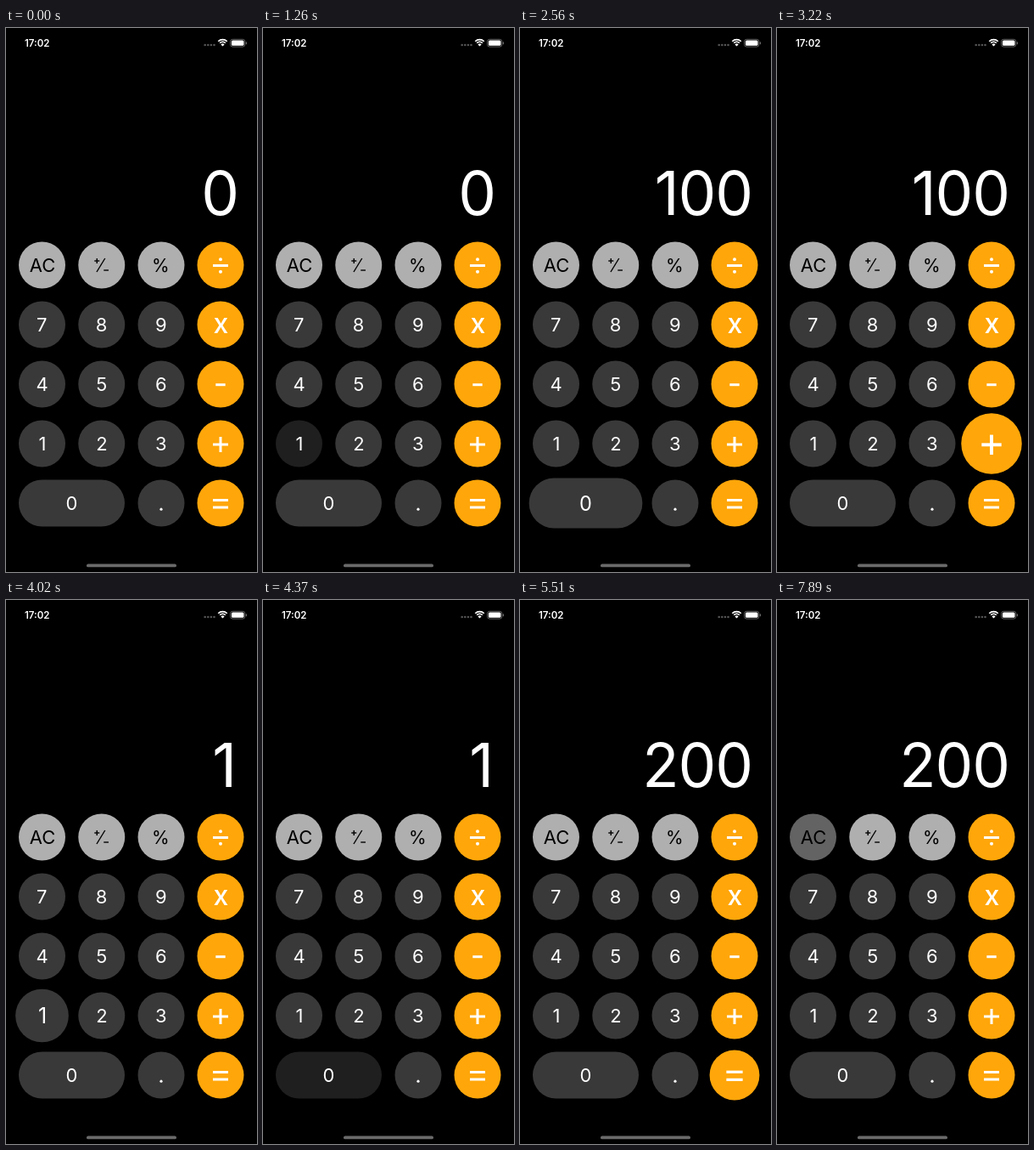
Write an HTML page with a canvas that moves like this. It is 296 px wide and 640 px high and loops after 8 s.

```html
<!DOCTYPE html>
<html lang="en">
<head>
<meta charset="utf-8">
<title>Calculator</title>
<style>
  html, body { margin: 0; width: 100%; height: 100%; overflow: hidden; background: #000; }
  canvas { display: block; width: 296px; height: 640px; }
</style>
</head>
<body>
<canvas id="stage"></canvas>
<script>
const W = 296, H = 640, LOOP = 8000;
const canvas = document.getElementById('stage');
const ctx = canvas.getContext('2d');
const dpr = window.devicePixelRatio || 1;
canvas.width = W * dpr;
canvas.height = H * dpr;

const FONT = 'Inter, "Liberation Sans", sans-serif';
const GREY = { fill: '#393939', down: '#1f1f1f', ink: '#fff' };
const LIGHT = { fill: '#afafaf', down: '#636363', ink: '#000' };
const ORANGE = { fill: '#ffa60a', down: '#915e06', ink: '#fff' };

const COLS = [42.5, 112.75, 183, 253];
const ROWS = [
  ['AC', '±', '%', '÷'],
  ['7', '8', '9', 'x'],
  ['4', '5', '6', '-'],
  ['1', '2', '3', '+'],
  ['0', null, '.', '=']
];

// time, display, active key, key scale (0 = held down)
const STEPS = [
  [0, '0'],
  [1150, '0', '1', 0], [1265, '1', '1', 1.25], [1380, '1', '1', 1.07],
  [2130, '1', '0', 0], [2250, '10', '0', 1.2],
  [2360, '10', '0', 0], [2460, '100', '0', 1.3], [2560, '100', '0', 1.07],
  [3000, '100', '+', 0], [3110, '100', '+', 1.14], [3220, '100', '+', 1.3], [3330, '100', '+', 1.07],
  [3910, '100', '1', 0], [4020, '1', '1', 1.14], [4140, '1', '1', 1.25], [4250, '1', '1', 1.07],
  [4360, '1', '0', 0], [4480, '10', '0', 1.2],
  [4600, '10', '0', 0], [4710, '100', '0', 1.3], [4810, '100', '0', 1.07],
  [5190, '100', '=', 0], [5300, '200', '=', 1.14], [5400, '200', '=', 1.3], [5510, '200', '=', 1.07],
  [7890, '200', 'AC', 0]
];

const keys = ROWS.flatMap((row, r) => row.map((label, c) => label && {
  label,
  x: label === '0' ? 77.5 : COLS[c],
  y: 279 + 70 * r,
  w: label === '0' ? 125 : 55,
  look: c === 3 ? ORANGE : r ? GREY : LIGHT
})).filter(Boolean);

// Places text by its inked edges: align 0 = left, 0.5 = centre, 1 = right.
function text(str, x, y, size, weight = 400, align = 0.5, spacing = 0) {
  ctx.font = `${weight} ${size}px ${FONT}`;
  ctx.letterSpacing = spacing + 'px';
  const m = ctx.measureText(str);
  const left = -m.actualBoundingBoxLeft, right = m.actualBoundingBoxRight;
  ctx.fillText(str, x - left - (right - left) * align, y);
}

function pill(x, y, w, h, r = h / 2) {
  ctx.beginPath();
  ctx.roundRect(x, y, w, h, r);
  ctx.fill();
}

function dot(x, y, r) {
  ctx.beginPath();
  ctx.arc(x, y, r, 0, Math.PI * 2);
  ctx.fill();
}

function line(x1, y1, x2, y2, width) {
  ctx.lineWidth = width;
  ctx.beginPath();
  ctx.moveTo(x1, y1);
  ctx.lineTo(x2, y2);
  ctx.stroke();
}

const bar = (y, half = 9) => line(-half, y, half, y, 3);

const SYMBOLS = {
  '±'() {
    line(-8.5, -5, -2.5, -5, 1.4);
    line(-5.5, -8, -5.5, -2, 1.4);
    line(-5.8, 8, 4, -8, 1.4);
    line(2.5, 6, 8.2, 6, 1.4);
  },
  '÷'() { bar(0.5); dot(0, -6.7, 2); dot(0, 7.7, 2); },
  '-'() { bar(0.7, 5.7); },
  '+'() { bar(1); line(0, -8, 0, 10, 3); },
  '='() { bar(-3.5); bar(5); },
  '.'() { dot(0, 7.2, 1.6); },
  'x'() { text('x', 0, 10, 32, 450); },
  '%'() { text('%', -0.5, 8, 21); }
};

function drawKey({ label, x, y, w, look }, active, scale) {
  const down = active && !scale;
  const s = active && scale || 1;
  ctx.save();
  ctx.translate(x, y);
  ctx.scale(s, s);
  ctx.fillStyle = down ? look.down : look.fill;
  pill(-w / 2, -27.5, w, 55);
  ctx.fillStyle = ctx.strokeStyle = look.ink;
  if (SYMBOLS[label]) SYMBOLS[label]();
  else text(label, 0, 8, 22);
  ctx.restore();
}

function drawStatus() {
  ctx.fillStyle = '#fff';
  text('17:02', 22, 21.7, 11.5, 600, 0);

  ctx.fillStyle = '#555';
  for (let i = 0; i < 4; i++) dot(234.7 + 3.6 * i, 20, 1.3);

  // Wi-Fi fan
  ctx.strokeStyle = ctx.fillStyle = '#fff';
  ctx.lineWidth = 1.7;
  for (const r of [7.4, 4.7]) {
    ctx.beginPath();
    ctx.arc(255.5, 21, r, -Math.PI * 0.75, -Math.PI * 0.25);
    ctx.stroke();
  }
  ctx.beginPath();
  ctx.moveTo(255.5, 21.5);
  ctx.arc(255.5, 21.5, 3, -Math.PI * 0.75, -Math.PI * 0.25);
  ctx.fill();

  // Battery
  ctx.strokeStyle = '#777';
  ctx.lineWidth = 0.8;
  ctx.beginPath();
  ctx.roundRect(264.6, 13.3, 17.2, 8.8, 2.6);
  ctx.stroke();
  pill(265.9, 14.6, 14.6, 6.2, 1.5);
  ctx.fillStyle = '#777';
  pill(282.8, 16.2, 1.1, 3, 0.5);

  // Home indicator
  ctx.fillStyle = '#6a6a6a';
  pill(95, 630.5, 106, 3.8);
}

function draw(t) {
  const [, value, pressed, scale] = STEPS.findLast(step => step[0] <= t);
  ctx.setTransform(dpr, 0, 0, dpr, 0, 0);
  ctx.fillStyle = '#000';
  ctx.fillRect(0, 0, W, H);
  drawStatus();
  ctx.fillStyle = '#fff';
  text(value, value === '1' ? 266.3 : 271.3, 219.8, 71, 400, 1, -1);
  for (const key of keys) drawKey(key, key.label === pressed, scale);
}

const start = performance.now();
function tick() {
  draw((performance.now() - start) % LOOP);
  requestAnimationFrame(tick);
}
tick();
</script>
</body>
</html>
```
